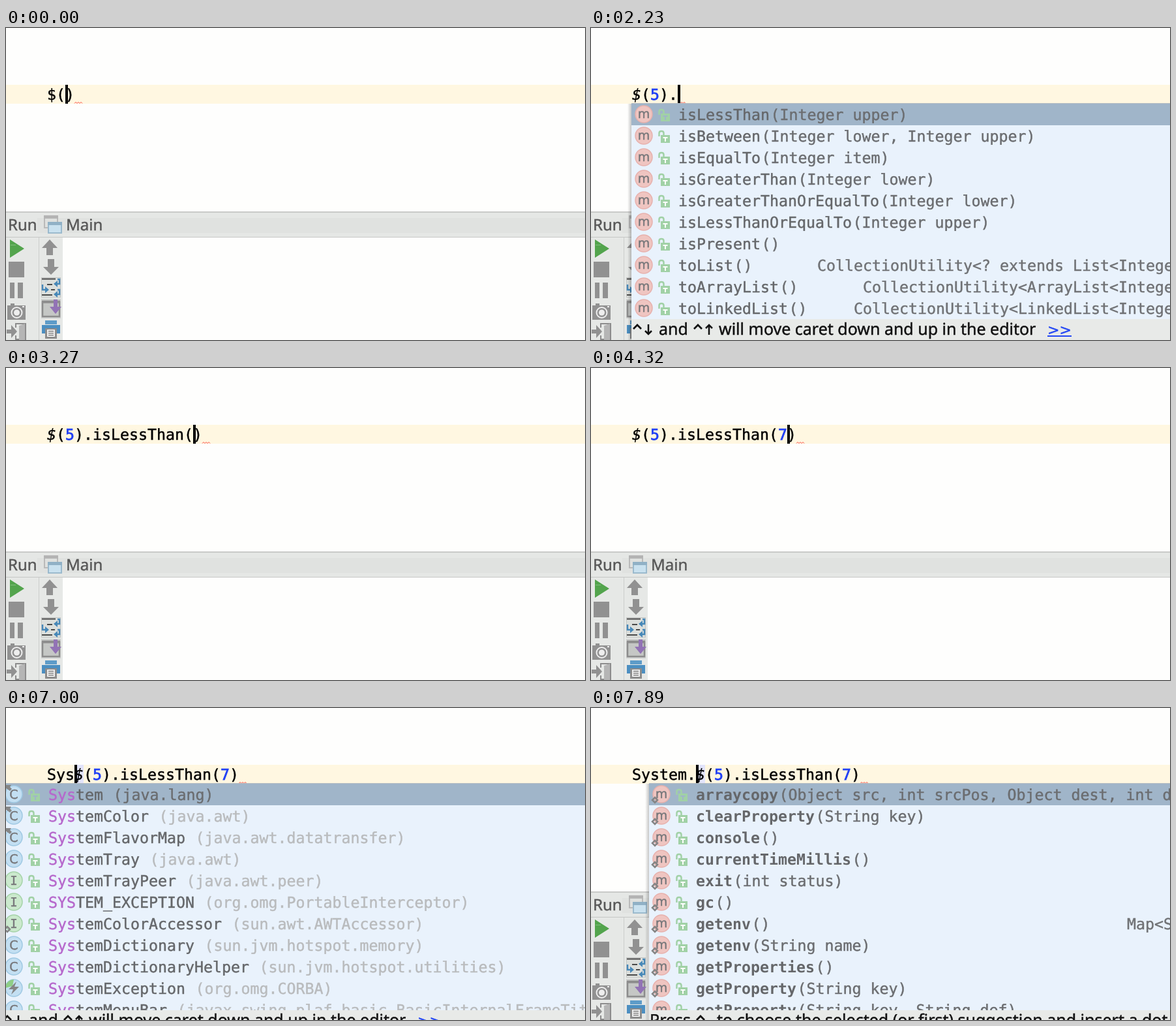
Recreate the animation shown at these times as an HTML page. Size 888 px wide and 478 px high, loop 8000 ms.

```html
<!DOCTYPE html>
<html lang="en">
<head>
<meta charset="utf-8">
<title>Code completion</title>
<style>
  html, body { margin: 0; width: 100%; height: 100%; overflow: hidden; background: #fefefd; }
  svg { display: block; width: 888px; height: 478px; }
  text { white-space: pre; text-rendering: geometricPrecision; fill: currentColor; stroke: currentColor; stroke-width: .45px; }
  .code { font: 23.254px "DejaVu Sans Mono", monospace; }
  .ui { font: 24px "Noto Sans", sans-serif; color: #585858; }
  .hint { font: 25px "Noto Sans", sans-serif; color: #111; }
  .more { font: 22px "DejaVu Sans", sans-serif; color: #2448f4; }
  .letter { font: 19px "DejaVu Sans", sans-serif; color: #77777a; text-anchor: middle; }
  .serif { font-family: "DejaVu Sans Mono", monospace; }
  .num { color: #2140f5; stroke-width: .8px; }
  .static { font-style: italic; }
  .match { color: #b668cc; }
  .bold { font-weight: bold; stroke-width: 0; }
</style>
</head>
<body>
<svg viewBox="0 0 888 478">
  <defs>
    <linearGradient id="shade">
      <stop offset="0" stop-color="#000" stop-opacity="0"/>
      <stop offset="1" stop-color="#000" stop-opacity=".22"/>
    </linearGradient>
    <linearGradient id="glow" x1="0" y1="0" x2="0" y2="1">
      <stop offset="0" stop-color="#edb359"/>
      <stop offset="1" stop-color="#f8c56f"/>
    </linearGradient>
  </defs>
  <rect width="888" height="478" fill="#fefefd"/>
  <rect y="87" width="888" height="29" fill="#fff7e1"/>

  <!-- Run panel -->
  <rect y="281" width="888" height="40" fill="#e5e7e5"/>
  <rect x="48" y="291" width="840" height="23" fill="#e0e2e0"/>
  <path d="M0 282H888" stroke="#c9cac9" stroke-width="2"/>
  <path d="M0 320.5H888" stroke="#c6c7c6"/>
  <rect y="321" width="87" height="157" fill="#e6e8e6"/>
  <path d="M50.5 321V478" stroke="#cbcdcb"/>
  <text class="ui" x="3" y="310">Run</text>
  <text class="ui" x="92" y="310">Main</text>
  <rect x="59" y="288" width="20" height="18" fill="#dfe1df" stroke="#bababa" stroke-width="2"/>
  <rect x="58" y="287" width="22" height="5" fill="#b4b4b4"/>
  <rect x="65" y="298" width="20" height="16" fill="#c9e1ef" stroke="#9bbacd" stroke-width="2"/>
  <rect x="64" y="297" width="22" height="5" fill="#90b1c6"/>

  <!-- Left tool column -->
  <path d="M6 324L28 338L6 352Z" fill="#53a44d"/>
  <path d="M7 332.5H15" stroke="#83be7e"/>
  <g fill="#919191">
    <path d="M4 358H28V382H4ZM6 390H13V414H6ZM18 390H26V414H18Z"/>
    <path d="M2 425H7V422H13V425H30V447H2Z"/>
    <path d="M1 462H8V455L17 465L8 475V468H1Z"/>
  </g>
  <circle cx="16.500" cy="436" r="8" fill="#919191" stroke="#eee" stroke-width="2"/>
  <circle cx="16.500" cy="436" r="4.500" fill="#eee"/>
  <path d="M25 427H28" stroke="#eee" stroke-width="2"/>
  <path d="M15 459V453H30V477H15V471" fill="none" stroke="#8c8c8c" stroke-width="2"/>
  <path d="M20 456L29 453V478H20Z" fill="#b5b5b5"/>

  <!-- Right tool column -->
  <path d="M67 324L79 337H72V348H62V337H55Z" fill="#919191"/>
  <path d="M69 378L57 366H64V354H74V366H81Z" fill="#919191"/>
  <rect x="54.500" y="382.500" width="29" height="30" fill="#dcdfdc" stroke="#c3c5c3"/>
  <path d="M55 384.500H76M55 409H71M63 393H71M69 401H75" stroke="#4a4a4a" stroke-width="2"/>
  <g fill="none" stroke="#4788b8" stroke-width="2.500">
    <path d="M79 385H82V392H75M79 401H82V408H75M56 393V401H63"/>
  </g>
  <path d="M73 392L79 387V397ZM73 408L79 403V413ZM66 401L60 396V406Z" fill="#4788b8"/>
  <rect x="54" y="415" width="30" height="30" fill="#cfd1cf"/>
  <path d="M56 420H82V442H56Z" fill="#c5c7c5" stroke="#8c8c8c" stroke-width="2.500"/>
  <path d="M55 419.500H83" stroke="#8c8c8c" stroke-width="4"/>
  <path d="M73 416H79V427H85L76 438L67 427H73Z" fill="#9273b5"/>
  <path d="M60 448H78V454H60Z" fill="#5d9bc8"/>
  <path d="M55 455H83V468H55Z" fill="#4c8fc1"/>
  <path d="M60 460H78V476H60Z" fill="#8c8c8c"/>
  <path d="M63 462H75V473H63Z" fill="#eee"/>
  <path d="M65 464.500H73M65 467.500H73M65 470.500H73" stroke="#555"/>

  <g id="editor"></g>
  <g id="popup"></g>
</svg>
<script>
const CELL = 14, LEFT = 63, ROW = 33, TOP = 116, WIDE = 960, LOOP = 8000;
const PAPER = '#e9f2fc', SELECTED = '#a0b5c9';
const CALL = '$(5).isLessThan';

// Row format: name|rest|right-hand type|type x (relative to names)|icon decoration
const LISTS = {
  checks: {
    icon: 'm', x: 134, footer: 446, hint: 'move',
    rows: [
      'isLessThan|(Integer upper)', 'isBetween|(Integer lower, Integer upper)',
      'isEqualTo|(Integer item)', 'isGreaterThan|(Integer lower)',
      'isGreaterThanOrEqualTo|(Integer lower)', 'isLessThanOrEqualTo|(Integer upper)',
      'isPresent|()',
      'toList|()|CollectionUtility<? extends List<Integer>>|213',
      'toArrayList|()|CollectionUtility<ArrayList<Integer>>|283',
      'toLinkedList|()|CollectionUtility<LinkedList<Integer>>|269'
    ]
  },
  classes: {
    icon: 'C', x: 65, footer: 463, hint: 'move', restColor: '#b9bbbd',
    rows: [
      'System| (java.lang)|||pin', 'SystemColor| (java.awt)|||pin',
      'SystemFlavorMap| (java.awt.datatransfer)|||pin', 'SystemTray| (java.awt)',
      'SystemTrayPeer| (java.awt.peer)|||I', 'SYSTEM_EXCEPTION| (org.omg.PortableInterceptor)|||I',
      'SystemColorAccessor| (sun.awt.AWTAccessor)|||I diamond',
      'SystemDictionary| (sun.jvm.hotspot.memory)',
      'SystemDictionaryHelper| (sun.jvm.hotspot.utilities)',
      'SystemException| (org.omg.CORBA)|||bolt',
      'SystemMenuBar| (javax.swing.plaf.basic.BasicInternalFrameTitlePane)'
    ]
  },
  statics: {
    icon: 'm', x: 161, footer: 463, hint: 'press', bold: true, deco: 'diamond',
    rows: [
      'arraycopy|(Object src, int srcPos, Object dest, int destPos, int length)',
      'clearProperty|(String key)', 'console|()', 'currentTimeMillis|()',
      'exit|(int status)', 'gc|()', 'getenv|()|Map<String, String>|661',
      'getenv|(String name)', 'getProperties|()', 'getProperty|(String key)',
      'getProperty|(String key, String def)'
    ]
  }
};

// Each step: start time, line text, caret column (-1 hides it), extras
const STEPS = [
  [0, '$()', 2, { upright: true }],
  [150, '$(5)', 3, { upright: true }],
  [440, '$(5)', 3],
  [1040, '$(5)', 4, { braces: true }],
  [1790, '$(5)', 4, { braces: true, bulb: true }],
  [1940, '$(5).', 5],
  [2090, '$(5).', 5, { list: 'checks', typed: '' }],
  [2240, '$(5).i', 6, { list: 'checks', typed: 'i' }],
  [2380, '$(5).is', 7, { list: 'checks', typed: 'i' }],
  [2530, '$(5).is', 7, { list: 'checks', typed: 'is' }],
  [3270, CALL + '()', 16],
  [3570, CALL + '()', 16, { error: 2 }],
  [4020, CALL + '(7)', 17, { error: 3 }],
  [4320, CALL + '(7)', 17],
  [4920, CALL + '(7)', 17, { bulb: true }],
  [5210, CALL + '(7)', -1, { bulb: true }],
  [5810, CALL + '(7)', 16],
  [6250, CALL + '(7)', 0, { usage: true }],
  ...[...'System'].map((_, i) => {
    const typed = 'System'.slice(0, i + 1);
    return [6700 + 150 * i, typed + CALL + '(7)', i + 1,
      { usage: true, ...(i > 1 && { list: 'classes', typed }) }];
  }),
  [7740, 'System.' + CALL + '(7)', 7, { usage: true }],
  [7890, 'System.' + CALL + '(7)', 7, { usage: true, list: 'statics', typed: '' }]
];

const colX = col => LEFT + col * CELL;
const esc = s => s.replace(/&/g, '&amp;').replace(/</g, '&lt;');
const rect = (x, y, w, h, fill) =>
  `<rect x="${x}" y="${y}" width="${w}" height="${h}" fill="${fill}"/>`;
const text = (x, y, cls, body, color = '') =>
  `<text x="${x}" y="${y}" class="${cls}" ${color && `color="${color}"`}>${body}</text>`;
const shape = (d, fill) => `<path d="${d}" fill="${fill}"/>`;
const stroke = (d, color, width) =>
  `<path d="${d}" fill="none" stroke="${color}" stroke-width="${width}"/>`;

function squiggle(x, width) {
  let d = `M${x} 115.500`;
  for (let i = 2; i < width; i += 2) d += `L${x + i} ${i % 4 ? 113.5 : 115.5}`;
  return stroke(d, '#fb4a42', 1);
}

function bulb() {
  return shape('M75 66A10 10 0 0 1 95 66C95 71 91 72 91 76H79C79 72 75 71 75 66Z', 'url(#glow)') +
    stroke('M80 65L83 68L85 65L87 68L90 65', '#fff0cf', 1.3) +
    stroke('M79 77.500H91M79 80.500H91M79 83H91', '#686868', 1.8) +
    shape('M80 83H90L87 86H83Z', '#777');
}

function drawLine([, line, caret, opts = {}]) {
  const dollar = line.indexOf('$'), end = line.length;
  let out = '';
  if (opts.braces) out += [1, 3].map(c => rect(colX(c), 87, CELL, 29, '#9bcbfa')).join('');
  if (opts.usage) out += rect(colX(dollar), 87, CELL, 29, '#e2e4fb');
  const body = line.replace(/\d/g, '<tspan class="num">$&</tspan>')
    .replace('$', `<tspan class="${opts.upright ? '' : 'static'}">$$</tspan>`);
  out += text(LEFT, 110, 'code', body, '#000') + squiggle(colX(end), 13);
  if (opts.error) out += squiggle(colX(end - opts.error), opts.error * CELL);
  if (caret >= 0) out += rect(colX(caret), 87, 4, 29, '#000');
  return out + (opts.bulb ? bulb() : '');
}

function icon(cx, cy, letter, deco) {
  const [fill, edge] = { m: ['#efc5c1', '#e7b1ad'], C: ['#c3dff2', '#9fc9e3'], I: ['#cbe9cd', '#a5d3a8'] }[letter];
  let out = `<circle cx="${cx}" cy="${cy}" r="13" fill="${fill}" stroke="${edge}" stroke-width="1.5"/>`;
  if (deco.includes('bolt')) {
    out += shape(`M${cx - 13} ${cy}A13 13 0 0 1 ${cx} ${cy - 13}L${cx - 2} ${cy - 3}Z`, '#8fce86') +
      shape(`M${cx + 4} ${cy - 10}L${cx - 8} ${cy + 2}H${cx - 1}L${cx - 4} ${cy + 10}L${cx + 8} ${cy - 2}H${cx + 1}Z`, '#858585');
  } else {
    out += text(cx, cy + (letter === 'm' ? 5.5 : 7), letter === 'I' ? 'letter serif' : 'letter', letter);
  }
  if (deco.includes('pin')) out += shape(`M${cx - 13} ${cy - 14}H${cx - 4}L${cx - 6} ${cy - 11}L${cx - 3} ${cy - 8}L${cx - 6} ${cy - 5}L${cx - 13} ${cy - 10}Z`, '#858585');
  if (deco.includes('diamond')) out += stroke(`M${cx - 10} ${cy + 5}l4 4l-4 4l-4 -4Z`, '#858585', 2.5);
  return out;
}

function lock(x, y, back) {
  return stroke(`M${x - 2.5} ${y + 2}V${y - 3}Q${x - 2.5} ${y - 6} ${x + 1} ${y - 6}T${x + 4.5} ${y - 3}V${y + 1}`, '#a1d1a6', 2.5) +
    rect(x, y, 14, 12, '#a1d1a6') +
    stroke(`M${x + 3.5} ${y + 4}H${x + 10.5}M${x + 7} ${y + 4}V${y + 10}`, back, 2);
}

const control = (cx, y) => stroke(`M${cx - 6} ${y - 9}L${cx} ${y - 15}L${cx + 6} ${y - 9}`, '#111', 2.8);
const arrow = (cx, y, dir) =>
  stroke(`M${cx} ${y - 8 - dir * 8}V${y - 8 + dir * 7}M${cx - 5} ${y - 8 + dir * 2}L${cx} ${y - 8 + dir * 7}L${cx + 5} ${y - 8 + dir * 2}`, '#111', 2.5);

function hint(kind, x, y) {
  if (kind === 'press') {
    return text(x - 71, y, 'hint', 'Press') + control(x + 7, y) + text(x + 16, y, 'hint', '.') +
      text(x + 32, y, 'hint', 'to choose the selected (or first) suggestion and insert a dot afterwards');
  }
  return control(x - 63, y) + arrow(x - 46, y, 1) + text(x - 30, y, 'hint', 'and') +
    control(x + 30, y) + arrow(x + 47, y, -1) +
    text(x + 62, y, 'hint', 'will move caret down and up in the editor') +
    text(x + 566, y, 'more', '&gt;&gt;') + stroke(`M${x + 566} ${y + 2}h37`, '#2448f4', 1.8);
}

function drawRow(list, typed, row, index) {
  const [name, rest, type = '', typeX, extra = ''] = row.split('|');
  const y = TOP + index * ROW, { x } = list, deco = extra + (list.deco || '');
  const at = typed ? name.toLowerCase().indexOf(typed.toLowerCase()) : -1;
  const label = at < 0 ? name : name.slice(0, at) +
    `<tspan class="match">${name.slice(at, at + typed.length)}</tspan>` + name.slice(at + typed.length);
  const restColor = index && list.restColor || '#6b6d70';
  return icon(x - 53, y + 16, extra[0] === 'I' ? 'I' : list.icon, deco) +
    lock(x - 27, y + 15, index ? '#fff' : SELECTED) +
    text(x, y + 25, 'code', `<tspan class="${list.bold ? 'bold' : ''}">${label}</tspan>` +
      `<tspan dx="1.5" color="${restColor}">${esc(rest)}</tspan>`, '#65676a') +
    (type && text(x + +typeX, y + 25, 'code', esc(type), '#707275'));
}

function drawPopup({ list: key, typed } = {}) {
  if (!key) return '';
  const list = LISTS[key], left = list.x - 72;
  return rect(left - 6, TOP, 6, 362, 'url(#shade)') + rect(left, TOP, WIDE, 362, PAPER) +
    rect(left, TOP - 1, WIDE, ROW + 1, SELECTED) + rect(left, TOP - 1, WIDE, 1, '#b4bcc2') +
    list.rows.map((row, i) => drawRow(list, typed, row, i)).join('') +
    rect(left, list.footer, WIDE, 40, '#e8eae8') + hint(list.hint, list.x, list.footer + 24);
}

const editor = document.getElementById('editor'), popup = document.getElementById('popup');
const start = performance.now();
let shown;

function tick() {
  const time = (performance.now() - start) % LOOP;
  const step = STEPS.findLast(s => s[0] <= time);
  if (step !== shown) {
    shown = step;
    editor.innerHTML = drawLine(step);
    popup.innerHTML = drawPopup(step[3]);
  }
  requestAnimationFrame(tick);
}
tick();
</script>
</body>
</html>
```
